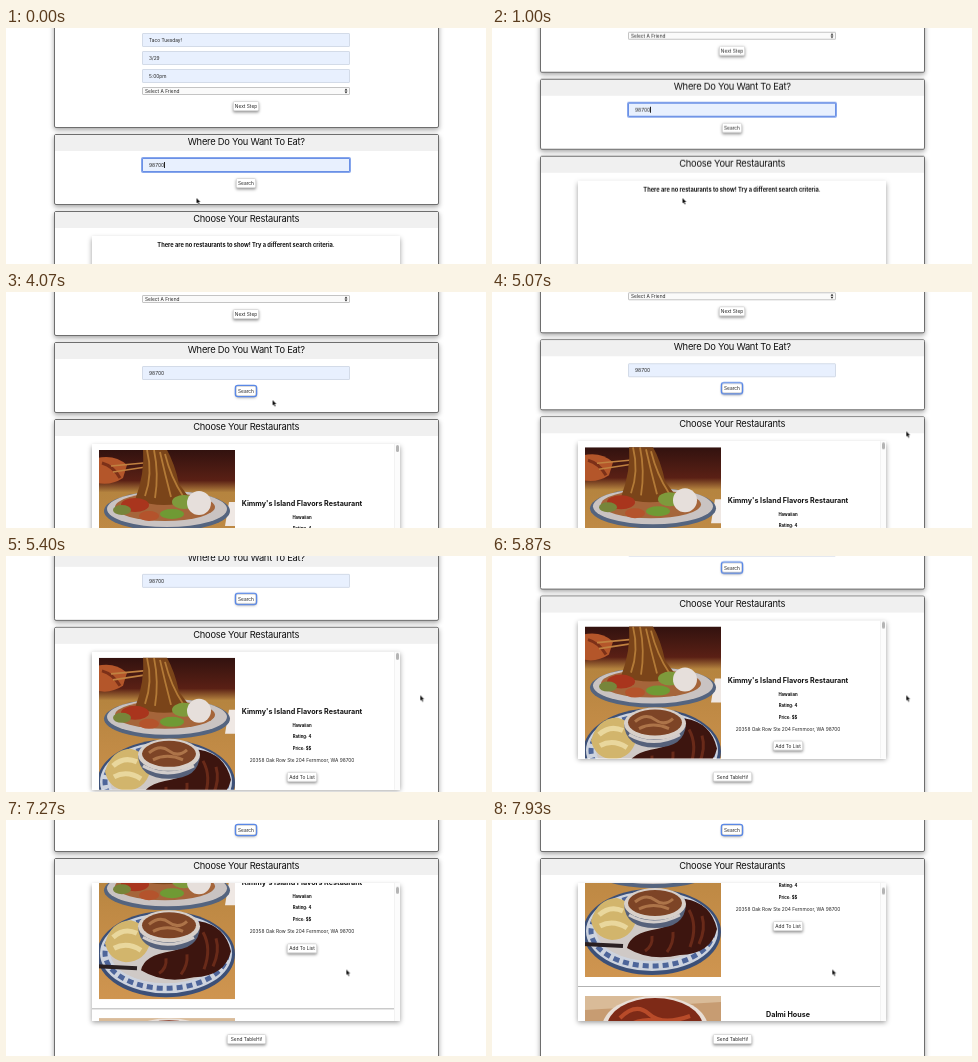
Animation of 480x236 px, one loop 8000 ms. Source, as an HTML page:

```html
<!DOCTYPE html>
<html lang="en">
<head>
<meta charset="utf-8">
<title>Plan a dinner</title>
<style>
html, body { margin: 0; width: 100%; height: 100%; overflow: hidden; background: #fff; }
body { position: relative; font: 4.8px/1 Inter, "Liberation Sans", sans-serif; color: #222; }
#page, #page div, #cursor { position: absolute; box-sizing: border-box; }
#page { left: 0; top: 0; width: 480px; height: 400px; animation: scroll 8s infinite; }

#page .card {
  left: 47.5px; width: 385.5px; border: 1px solid #6e6e6e; border-radius: 2px;
  background: #fff; box-shadow: 0 2px 5px rgba(0,0,0,.36);
}
.card h2 {
  margin: 0; height: 15.5px; background: #f0f0f0; color: #111;
  font-size: 9.33px; font-weight: 400; line-height: 13.6px;
  letter-spacing: -.24px; text-align: center;
}
#page .field {
  left: 136px; width: 208px; height: 14px; padding-left: 6px;
  border: 1px solid #d3dbe8; border-radius: 1px; background: #e8f0fe; line-height: 12.4px;
}
#page .select {
  left: 136px; top: 59px; width: 208px; height: 8px; padding-left: 2px;
  border: 1px solid #c4c4c4; border-radius: 1px; background: #fafafa; line-height: 6.4px;
}
.select svg { position: absolute; right: 1px; top: 0; }
#page .button {
  height: 10px; border: 1px solid #dcdcdc; border-radius: 1.5px; background: #fff;
  box-shadow: 0 1.5px 3px rgba(0,0,0,.42); line-height: 8.4px; text-align: center; white-space: nowrap;
}
#page .zip { font-size: 5px; animation: blur 8s infinite step-end; }
#page .caret {
  left: 21.4px; top: 3px; width: .7px; height: 6.5px; background: #222;
  animation: blink 8s infinite step-end;
}
#page .ring {
  inset: -1px; border-radius: 2px; box-shadow: 0 0 0 1.3px #5a88e6; opacity: 0;
  animation: press 8s infinite;
}

#page .list {
  left: 86px; top: 208px; width: 308px; height: 138px; overflow: hidden;
  background: #fff; border-radius: 1px;
}
#page .lift {
  left: 86px; top: 208px; width: 308px; height: 138px;
  box-shadow: 0 1.5px 5px rgba(0,0,0,.4);
}
#page .none {
  left: 0; top: 6px; width: 100%; text-align: center; color: #111; white-space: nowrap;
  font-size: 5.7px; font-weight: 700; animation: until 8s infinite step-end;
}
#page .results { inset: 0; visibility: hidden; animation: found 8s infinite step-end; }
#page .rows { left: 0; top: 0; width: 302px; height: 300px; animation: browse 8s infinite; }
.photo { position: absolute; left: 6.5px; visibility: hidden; animation: loaded 8s infinite step-end; }
.soft { filter: blur(.6px); }
#page .line { left: 120px; width: 180px; height: 10px; line-height: 10px; text-align: center; white-space: nowrap; }
#page .name { font-size: 7.15px; font-weight: 700; color: #111; }
#page .fact { font-size: 4.27px; font-weight: 700; color: #111; }
#page .rule { left: 0; top: 185px; width: 302px; height: 1px; background: #b2b2b2; }
#page .track {
  right: 0; top: 0; width: 6px; height: 100%; background: #fcfcfc; border-left: 1px solid #f2f2f2;
  visibility: hidden; animation: track 8s infinite step-end;
}
#page .thumb {
  left: 1px; top: .5px; width: 3px; height: 7px; border-radius: 1.5px; background: #b4b4b4;
  animation: thumb 8s infinite;
}
#cursor { left: 0; top: 0; overflow: visible; animation: move 8s infinite; }

@keyframes scroll {
  0%, 7.5% { transform: none; animation-timing-function: cubic-bezier(.4,0,.2,1); }
  13.375%, 62.5% { transform: translateY(-56px); animation-timing-function: cubic-bezier(.4,0,.8,.8); }
  67.5% { transform: translateY(-112px); animation-timing-function: cubic-bezier(.2,.4,.5,1); }
  73.375% { transform: translateY(-143.4px); animation-timing-function: ease-out; }
  79.125%, 100% { transform: translateY(-145px); }
}
@keyframes browse {
  0%, 82.5% { transform: none; animation-timing-function: ease-in; }
  85% { transform: translateY(-22px); animation-timing-function: linear; }
  92.5% { transform: translateY(-70px); animation-timing-function: ease-out; }
  99%, 100% { transform: translateY(-82px); }
}
@keyframes thumb {
  0%, 82.5% { transform: none; }
  85% { transform: translateY(1px); }
  99%, 100% { transform: translateY(3.5px); }
}
@keyframes move {
  0%, 15.875% { transform: translate(190.5px,170px); animation-timing-function: ease-in-out; }
  25%, 32.5% { transform: translate(243px,98px); }
  42.5%, 43.2% { transform: translate(249px,99px); }
  45.875% { transform: translate(250px,100px); }
  49.125%, 50.875% { transform: translate(266.5px,108px); }
  54.125%, 57.5% { transform: translate(300px,118px); }
  59.125%, 73.375% { transform: translate(414.3px,139.3px); animation-timing-function: ease-in-out; }
  79.125%, 85% { transform: translate(343.8px,152px); }
  92%, 100% { transform: translate(340.3px,149.5px); }
}
@keyframes blink {
  0%, 11.5%, 24.5% { visibility: visible; }
  5%, 18%, 25.6%, 100% { visibility: hidden; }
}
@keyframes blur {
  0% { border-color: #6a90e6; box-shadow: 0 0 0 1px #86a6ec; }
  25.6%, 100% { border-color: #d3dbe8; box-shadow: none; }
}
@keyframes press { 0%, 26.6% { opacity: 0; } 28.4%, 100% { opacity: 1; } }
@keyframes until { 0% { visibility: visible; } 37.5%, 100% { visibility: hidden; } }
@keyframes found { 0% { visibility: hidden; } 37.5%, 100% { visibility: visible; } }
@keyframes track { 0% { visibility: hidden; } 46%, 100% { visibility: visible; } }
@keyframes loaded { 0% { visibility: hidden; } 50.6%, 100% { visibility: visible; } }
</style>
</head>
<body>
<div id="page">
  <div class="card" style="top:-60px;height:160px"></div>
  <div class="field" style="top:4.5px">Taco Tuesday!</div>
  <div class="field" style="top:23px">3/29</div>
  <div class="field" style="top:41px">5:00pm</div>
  <div class="select">Select A Friend
    <svg width="4" height="6" viewBox="0 0 4 6"><path d="M.6 2.5L2 .5 3.4 2.5zM.6 3.5L2 5.5 3.4 3.5z" fill="#222"/></svg>
  </div>
  <div class="button" style="left:227px;top:73px;width:26px">Next Step</div>

  <div class="card" style="top:106px;height:71px"><h2>Where Do You Want To Eat?</h2></div>
  <div class="field zip" style="top:129.5px">98700<div class="caret"></div></div>
  <div class="button" style="left:230px;top:150px;width:20px">Search<div class="ring"></div></div>

  <div class="card" style="top:183px;height:230px"><h2>Choose Your Restaurants</h2></div>
  <div class="lift"></div>
  <div class="list">
    <div class="none">There are no restaurants to show! Try a different search criteria.</div>
    <div class="results">
      <div class="rows">
        <svg class="photo" style="top:6px" width="136" height="170" viewBox="0 0 136 170">
          <defs>
            <linearGradient id="table" x2="0" y2="1">
              <stop offset="0" stop-color="#32120f"/><stop offset=".18" stop-color="#5a2015"/>
              <stop offset=".25" stop-color="#b5843f"/><stop offset=".5" stop-color="#c08a45"/>
              <stop offset="1" stop-color="#cf9550"/>
            </linearGradient>
          </defs>
          <path d="M0 0H136V170H0z" fill="url(#table)"/>
          <g class="soft">
            <path d="M-2 8Q16 4 28 15L24 28Q12 36 -2 33z" fill="#b4562a"/>
            <path d="M3 13Q14 16 21 28" fill="none" stroke="#7c3018" stroke-width="3"/>
            <path d="M12 16L66 11M14 22L60 15" stroke="#c08140" stroke-width="1.6"/>
            <path d="M130 52H138V76H126z" fill="#efe8e4"/>
            <ellipse cx="68" cy="61" rx="63" ry="20" fill="#54647f"/>
            <ellipse cx="68" cy="59" rx="60" ry="18" fill="#c9c3c2"/>
            <ellipse cx="66" cy="57" rx="50" ry="14" fill="#a5653a"/>
            <path d="M44-2H67Q76 14 80 34L92 50Q66 60 36 50Q46 24 44-2z" fill="#7a4419"/>
            <path d="M48 0Q54 24 46 46M55 0Q60 24 56 48M61 2Q66 24 72 47M66 4Q72 28 84 46" fill="none" stroke="#b37a37" stroke-width="1.8"/>
            <ellipse cx="36" cy="55" rx="14" ry="7" fill="#a9351d"/>
            <ellipse cx="23" cy="60" rx="9" ry="5" fill="#77853a"/>
            <ellipse cx="85" cy="52" rx="12" ry="7" fill="#7e9a3c"/>
            <ellipse cx="73" cy="64" rx="12" ry="5" fill="#6f9a34"/>
            <ellipse cx="50" cy="66" rx="10" ry="5" fill="#b4532c"/>
            <circle cx="100" cy="53" r="12" fill="#e6dfdb"/>

            <ellipse cx="67" cy="125" rx="69" ry="43" fill="#3c5078"/>
            <ellipse cx="67" cy="124" rx="66" ry="40" fill="#cdd3de"/>
            <ellipse cx="67" cy="124" rx="61" ry="35" fill="none" stroke="#4d659a" stroke-width="5" stroke-dasharray="6 4"/>
            <ellipse cx="67" cy="123" rx="56" ry="31" fill="#cfc9c6"/>
            <path d="M6 114Q12 92 32 91Q51 96 51 114Q46 132 27 133Q10 131 6 114z" fill="#d2b56c"/>
            <path d="M14 108Q25 98 38 104M15 119Q28 112 42 121" fill="none" stroke="#e9d79d" stroke-width="5"/>
            <path d="M100 92Q126 96 132 122Q126 147 95 148Q65 155 42 141Q45 126 72 122Q94 118 100 92z" fill="#3d150f"/>
            <path d="M104 103Q113 119 105 140M117 109Q121 122 114 137M88 125Q89 136 82 145M67 129Q68 139 60 144" fill="none" stroke="#692a19" stroke-width="3"/>
            <path d="M39 97Q40 121 70 121T101 97z" fill="#56617a"/>
            <path d="M44 108Q68 122 95 108" fill="none" stroke="#d2cdcb" stroke-width="3"/>
            <ellipse cx="70" cy="97" rx="31" ry="16" fill="#d8d0c9"/>
            <ellipse cx="70" cy="96" rx="27" ry="13" fill="#7d4426"/>
            <path d="M50 95Q61 86 70 93T88 92M54 102Q68 95 84 102" fill="none" stroke="#ad7449" stroke-width="3"/>
            <path d="M-2 137L38 139" stroke="#2a2022" stroke-width="4"/>
          </g>
        </svg>
        <div class="line name" style="top:55px">Kimmy's Island Flavors Restaurant</div>
        <div class="line fact" style="top:68.5px">Hawaiian</div>
        <div class="line fact" style="top:80px">Rating: 4</div>
        <div class="line fact" style="top:91.5px">Price: $$</div>
        <div class="line" style="top:103.2px">20358 Oak Row Ste 204 Fernmoor, WA 98700</div>
        <div class="button" style="left:195px;top:120px;width:30px">Add To List</div>
        <div class="rule"></div>
        <svg class="photo" style="top:195px" width="136" height="100" viewBox="0 0 136 100">
          <path d="M0 0H136V100H0z" fill="#c79c72"/>
          <g class="soft">
            <path d="M0 0H136V6L0 14z" fill="#d9bb98"/>
            <ellipse cx="70" cy="32" rx="53" ry="32" fill="#e8ded6"/>
            <ellipse cx="70" cy="31" rx="48" ry="29" fill="#7e2a17"/>
            <path d="M35 22Q51 6 64 18T105 20M42 30Q62 19 80 28" fill="none" stroke="#b84b29" stroke-width="4"/>
          </g>
        </svg>
        <div class="line name" style="top:209px">Dalmi House</div>
      </div>
      <div class="track"><div class="thumb"></div></div>
    </div>
  </div>
  <div class="button" style="left:221px;top:359px;width:39px">Send TableHi!</div>
</div>
<svg id="cursor" width="6" height="8" viewBox="0 0 6 8">
  <path d="M0 0V5.3L1.2 4.2 2.1 6.4 3 6 2.1 3.9H3.8z" fill="#111" stroke="#fff" stroke-width=".8" paint-order="stroke"/>
</svg>
</body>
</html>
```
